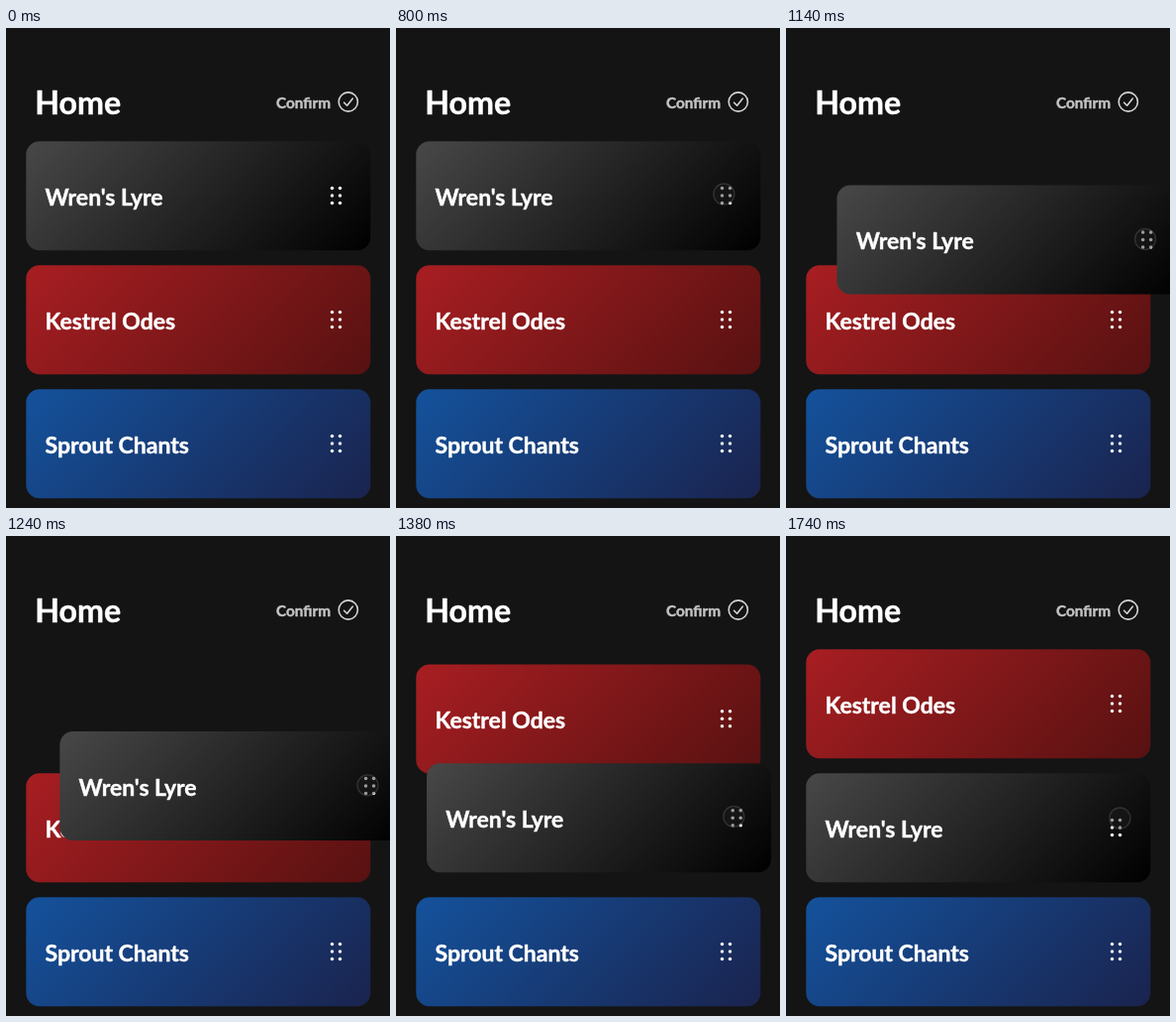
Write an HTML page with a canvas that moves like this. It is 388 px wide and 484 px high and loops after 3.24 s.

```html
<!DOCTYPE html>
<html lang="en">
<head>
<meta charset="utf-8">
<title>Reorder list</title>
<style>
  html, body { margin: 0; width: 100%; height: 100%; overflow: hidden; background: #141414; }
  canvas { display: block; }
</style>
</head>
<body>
<canvas id="stage"></canvas>
<script>
const W = 388, H = 484, LOOP = 3240;
const CARD = { x: 20.3, w: 348, h: 110, r: 13.5, top: 114.2, step: 125 };
const LIFT = 1010, DROP = 1410, SETTLE = 111, SWAP = 1297;
const FONT = 'Lato, "Open Sans", sans-serif';

// Drag offset over time: [ms, dx, dy]
const PATH = [
  [LIFT, 0, 0], [1140, 31, 44], [1230, 34, 79],
  [1320, 31, 107], [1380, 11, 115], [DROP, 6, 117]
];

const CARDS = {
  grey: { name: "Wren's Lyre", from: '#484848', to: '#000000' },
  red: { name: 'Kestrel Odes', from: '#a81e22', to: '#571111' },
  blue: { name: 'Sprout Chants', from: '#14529c', to: '#1a234e' }
};

const canvas = document.getElementById('stage');
const ctx = canvas.getContext('2d');
const dpr = window.devicePixelRatio || 1;
canvas.width = W * dpr;
canvas.height = H * dpr;
canvas.style.width = W + 'px';
canvas.style.height = H + 'px';

const clamp = v => Math.min(1, Math.max(0, v));
const span = (t, start, length) => clamp((t - start) / length);

// Cubic bezier easing, solved by bisection
function bezier(x1, y1, x2, y2) {
  const at = (a, b, s) => 3 * a * s * (1 - s) ** 2 + 3 * b * s * s * (1 - s) + s ** 3;
  return x => {
    let lo = 0, hi = 1;
    for (let i = 0; i < 24; i++) {
      const mid = (lo + hi) / 2;
      if (at(x1, x2, mid) < x) lo = mid; else hi = mid;
    }
    return at(y1, y2, lo);
  };
}
const easeInOut = bezier(0.42, 0, 0.58, 1);
const easeOut = bezier(0, 0, 0.58, 1);

function slope(i, k) {
  if (i === 0 || i === PATH.length - 1) return 0;
  const a = PATH[i - 1], b = PATH[i + 1];
  return (b[k] - a[k]) / (b[0] - a[0]);
}

// Smooth curve through the drag points
function drag(t) {
  const last = PATH.length - 1;
  if (t <= LIFT) return [0, 0];
  if (t >= DROP) return PATH[last].slice(1);
  let i = 0;
  while (t > PATH[i + 1][0]) i++;
  const a = PATH[i], b = PATH[i + 1], d = b[0] - a[0], s = (t - a[0]) / d;
  return [1, 2].map(k =>
    a[k] * (1 + 2 * s) * (1 - s) ** 2 + slope(i, k) * d * s * (1 - s) ** 2 +
    b[k] * s * s * (3 - 2 * s) + slope(i + 1, k) * d * s * s * (s - 1));
}

// A thin outline thickens the bold weight a little
function text(str, x, y, size, color) {
  ctx.font = `700 ${size}px ${FONT}`;
  ctx.fillStyle = ctx.strokeStyle = color;
  ctx.lineWidth = 0.45;
  ctx.lineJoin = 'round';
  ctx.fillText(str, x, y);
  ctx.strokeText(str, x, y);
}

function disc(x, y, r) {
  ctx.beginPath();
  ctx.arc(x, y, r, 0, Math.PI * 2);
}

function header() {
  text('Home', 29.2, 87, 32.2, '#ffffff');
  text('Confirm', 273, 80.5, 15.3, '#c4c4c4');
  ctx.strokeStyle = '#d4d4d4';
  ctx.lineWidth = 1.6;
  ctx.lineCap = 'round';
  disc(345.8, 74.5, 9.6);
  ctx.stroke();
  ctx.beginPath();
  ctx.moveTo(341.6, 75.2);
  ctx.lineTo(344.6, 78.2);
  ctx.lineTo(350.2, 71.2);
  ctx.stroke();
}

function card({ name, from, to }, dx, y) {
  const { w, h, r } = CARD, reach = (w + h) / 4;
  ctx.save();
  ctx.translate(CARD.x + dx, y);
  const fill = ctx.createLinearGradient(w / 2 - reach, h / 2 - reach, w / 2 + reach, h / 2 + reach);
  fill.addColorStop(0, from);
  fill.addColorStop(1, to);
  ctx.fillStyle = fill;
  ctx.beginPath();
  ctx.roundRect(0, 0, w, h, r);
  ctx.fill();
  text(name, 19.2, 64.5, 23, '#ffffff');
  ctx.fillStyle = '#f0f0f0';
  for (let i = 0; i < 6; i++) {
    disc(309.2 + (i % 2) * 8, 47.4 + (i >> 1) * 7.5, 1.75);
    ctx.fill();
  }
  ctx.restore();
}

function pointer(t) {
  const [dx, dy] = drag(t + 3);
  ctx.globalAlpha = span(t, 700, 80);
  disc(331.4 + dx, 167.5 + dy, 10.5);
  ctx.fillStyle = 'rgba(30, 30, 30, 0.4)';
  ctx.fill();
  ctx.strokeStyle = 'rgba(110, 110, 110, 0.35)';
  ctx.lineWidth = 1.4;
  ctx.stroke();
  ctx.globalAlpha = 1;
}

function draw(t) {
  const { top, step } = CARD;
  const swap = easeInOut(span(t, SWAP, SETTLE));
  const settle = easeOut(span(t, DROP, SETTLE));
  const [dx, dy] = drag(t);

  ctx.setTransform(dpr, 0, 0, dpr, 0, 0);
  ctx.fillStyle = '#141414';
  ctx.fillRect(0, 0, W, H);
  header();
  card(CARDS.red, 0, top + step * (1 - swap));
  card(CARDS.blue, 0, top + step * 2);
  card(CARDS.grey, dx * (1 - settle), top + dy + (step - dy) * settle);
  pointer(t);
}

const start = performance.now();
function tick() {
  draw((performance.now() - start) % LOOP);
  requestAnimationFrame(tick);
}
tick();
</script>
</body>
</html>
```
